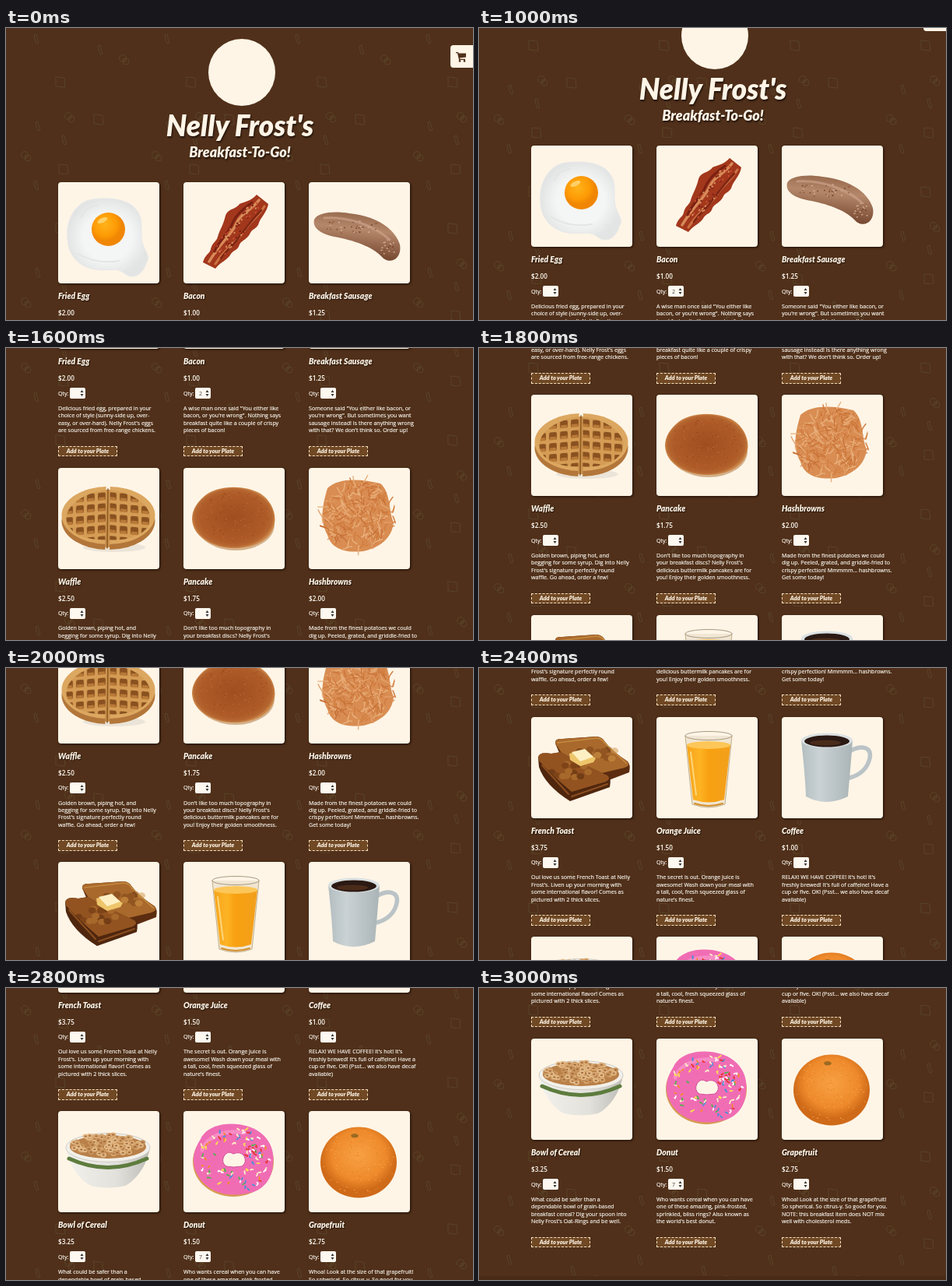
An HTML page that plays this animation: 600 by 375 pixels, repeating every 3750 ms.

```html
<!DOCTYPE html>
<html lang="en">
<head>
<meta charset="utf-8">
<title>Breakfast-To-Go!</title>
<style>
  html, body { margin: 0; width: 100%; height: 100%; overflow: hidden; background: #50301a; }
  body { position: relative; color: #fffcf5; font: 7.1px/9.4px "Open Sans", sans-serif; }
  #page { position: absolute; left: 0; top: 0; width: 600px; height: 1356px; animation: scroll 3750ms steps(21) infinite; }
  @keyframes scroll {
    0%, 23.99% { top: 0; }
    79.99%, 100% { top: -981px; }
  }
  #page > *, .item > * { position: absolute; margin: 0; white-space: pre; }
  h1, h2, h3, .add { font-family: Lato, sans-serif; font-style: italic; font-weight: 900; color: #fef5e7; }
  h1, h2 { left: 0; width: 601px; text-align: center; text-shadow: 1px 2px 2px #24130a; }
  h1 { top: 104px; font-size: 36.8px; line-height: 42px; }
  h2 { top: 148px; font-size: 18px; line-height: 22px; }
  .cart { left: 571px; top: 22px; width: 29px; height: 29px; background: #fef5e7; border-radius: 4px 0 0 4px; }
  .cart svg { position: absolute; left: 0; top: 0; }
  .item { width: 140px; height: 280px; }
  .card { left: 0; top: 0; width: 130px; height: 130px; background: #fef5e7; border-radius: 4px; box-shadow: 1px 1px 3px #1c0d05; }
  h3 { left: 0; top: 139px; font-size: 10.3px; line-height: 14px; text-shadow: 1px 1px 1px #24130a; }
  .price { left: 0; top: 162px; font-size: 8.2px; font-weight: 600; line-height: 12px; }
  .qty, .text { -webkit-text-stroke: .15px; }
  .qty { left: 0; top: 182.5px; }
  .pick { left: 15px; top: 180px; width: 20px; height: 14px; border-radius: 2px; background: #fdf8f0; color: #444; line-height: 14px; text-indent: 5px; }
  .pick svg { position: absolute; left: 13px; top: 3px; }
  .text { left: 0; top: 201.7px; }
  .add { left: 0; top: 254.5px; width: 74px; height: 11.5px; border: 1px dashed #f3dfc0; background: #704824; text-align: center; line-height: 11px; font-size: 7.4px; }
</style>
</head>
<body>
<main id="page">
  <svg width="600" height="1356">
    <defs>
      <pattern id="doodles" width="168" height="188" patternUnits="userSpaceOnUse">
        <g fill="none" stroke="#584226" stroke-width="1">
          <g id="toast"><path d="M64 65q-2-2 1-2l9 1q3 1 1 3l1 8q0 1-2 1l-9-1q-2 0-1-2z"/></g>
          <use href="#toast" x="49" y="48"/><use href="#toast" x="4" y="112"/>
          <g id="ring"><circle cx="150" cy="39" r="4.5"/><circle cx="154" cy="43" r="4"/><circle cx="152" cy="41" r="1.5"/></g>
          <use href="#ring" x="-70" y="74"/><use href="#ring" x="-126" y="124"/>
          <g id="strip"><path d="M36 9l3-1 1 5 2 6-3 1-2-5z"/></g>
          <use href="#strip" x="2" y="112"/><use href="#strip" x="82" y="14"/><use href="#strip" x="36" y="130"/>
        </g>
      </pattern>
      <pattern id="grid" width="14" height="14" patternUnits="userSpaceOnUse" patternTransform="translate(7 1)">
        <rect width="14" height="14" fill="#d59c55"/>
        <rect x="2" y="2" width="10" height="10" rx="2" fill="#8a5120"/>
        <path d="M3 8h8v4H3z" fill="#b97a38"/>
      </pattern>
      <radialGradient id="yolk" cx=".4" cy=".35"><stop stop-color="#ffb31a"/><stop offset=".7" stop-color="#fd9a05"/><stop offset="1" stop-color="#f08603"/></radialGradient>
      <radialGradient id="white"><stop offset=".6" stop-color="#f4f5f5"/><stop offset="1" stop-color="#e3e5e5"/></radialGradient>
      <linearGradient id="link" x1=".6" y1="0" x2=".4" y2="1"><stop stop-color="#94664a"/><stop offset=".35" stop-color="#b5876a"/><stop offset="1" stop-color="#6a3d26"/></linearGradient>
      <radialGradient id="cake"><stop stop-color="#a04e20"/><stop offset=".8" stop-color="#ae5b28"/><stop offset=".94" stop-color="#b66731"/><stop offset="1" stop-color="#cb8547"/></radialGradient>
      <linearGradient id="juice"><stop stop-color="#f6a41c"/><stop offset=".3" stop-color="#fdb324"/><stop offset=".5" stop-color="#f8a010"/><stop offset="1" stop-color="#f2a01c"/></linearGradient>
      <linearGradient id="mug"><stop stop-color="#b3bdc0"/><stop offset=".35" stop-color="#cad2d4"/><stop offset="1" stop-color="#aab4b7"/></linearGradient>
      <linearGradient id="bowl"><stop stop-color="#f2f1ec"/><stop offset=".6" stop-color="#e2e1dc"/><stop offset="1" stop-color="#bdbcb7"/></linearGradient>
      <radialGradient id="citrus" cx=".5" cy=".4"><stop stop-color="#f8a143"/><stop offset=".7" stop-color="#ee8a2b"/><stop offset="1" stop-color="#cf6a18"/></radialGradient>
      <clipPath id="left"><path d="M0 0H62L60 130H0z"/></clipPath>
      <clipPath id="right"><path d="M67 0H130V130H66z"/></clipPath>
    </defs>
    <rect width="600" height="1356" fill="url(#doodles)"/>
    <rect y="1351" width="600" height="5" fill="#482a17"/>
    <circle cx="303" cy="57" r="43" fill="#fef5e7"/>
  </svg>
  <h1>Nelly Frost's</h1>
  <h2>Breakfast-To-Go!</h2>
  <div class="cart">
    <svg width="29" height="29" fill="#4f2f1b">
      <path d="M7 9h3l.6 1.6H20v5l-8 1 .3 1.2H19V19h-8L9 10.3H7z"/>
      <circle cx="12" cy="20.4" r="1.3"/><circle cx="18" cy="20.4" r="1.3"/>
    </svg>
  </div>
</main>
<script>
  let seed = 7;
  const rnd = (a = 1, b = 0) => (seed = seed * 16807 % 2147483647, b + (a - b) * seed / 2147483647);
  const any = list => list[Math.floor(rnd(list.length))];
  const many = (n, draw) => Array.from({ length: n }, draw).join('');
  const path = (d, fill, more = '') => `<path d="${d}" fill="${fill}" ${more}/>`;
  const line = (d, color, w, more = '') => path(d, 'none', `stroke="${color}" stroke-width="${w}" stroke-linecap="round" ${more}`);
  const oval = (x, y, rx, ry, fill, more = '') => `<ellipse cx="${x}" cy="${y}" rx="${rx}" ry="${ry}" fill="${fill}" ${more}/>`;
  const group = (more, parts) => `<g ${more}>${parts}</g>`;

  // A random point inside an ellipse, kept outside an inner share of it.
  const spot = (x, y, rx, ry, inner = 0) => {
    const a = rnd(2 * Math.PI), r = Math.sqrt(rnd(1, inner * inner));
    return [x + rx * r * Math.cos(a), y + ry * r * Math.sin(a)];
  };
  const dots = (n, area, colors, size) => many(n, () => {
    const [x, y] = spot(...area);
    return oval(x, y, size, size * .8, any(colors));
  });
  const dashes = (n, area, colors, len, w) => many(n, () => {
    const [x, y] = spot(...area), a = rnd(2 * Math.PI), l = rnd(len, len / 2);
    return line(`M${x} ${y}q${rnd(3, -3)} ${rnd(3, -3)} ${l * Math.cos(a)} ${l * Math.sin(a)}`, any(colors), w);
  });

  const waffleHalf = (side, skew) => group(`clip-path="url(#${side})"`,
    oval(64.5, 68, 60, 37, '#b3763a') + oval(64.5, 61, 60, 37, '#dca760') +
    group(`transform="translate(64 60) skewY(${skew}) translate(-64 -60)"`, oval(64.5, 60, 54, 32, 'url(#grid)')));

  const art = {
    egg: () =>
      path('M45 22C65 19 91 22 100 35C111 48 105 62 108 78C112 90 119 95 113 104C108 121 95 125 85 117C75 108 62 115 48 112C30 110 12 96 12 71C10 45 25 24 45 22Z', 'url(#white)', 'stroke="#e6e7e7"') +
      line('M26 92Q50 106 78 101M96 102q6 6 10 0M30 45Q34 32 50 30', '#e3e5e5', 2) +
      oval(64.5, 60.5, 21.5, 21.5, 'url(#yolk)') + oval(57, 49, 7, 3, '#ffcf66', 'transform="rotate(-25 57 49)"'),
    bacon: () =>
      path('M94 16L109 28C108 37 99 46 97 52C95 60 88 60 86 65C82 74 75 74 72 80C70 88 64 87 61 92C56 101 49 101 41 111L25 103C28 92 34 92 35 86C37 77 43 76 44 70C47 60 51 56 54 43C58 33 66 36 72 28C78 25 86 25 94 16Z', '#a2371c') +
      line('M97 23C86 38 75 38 68 53C62 68 48 76 33 102', '#d88a58', 3.5) +
      line('M104 31C95 46 84 52 77 64C68 78 54 84 41 105', '#cb7242', 3) +
      line('M88 26C72 38 66 44 61 57C55 68 45 77 40 89', '#7a2012', 3) +
      line('M100 36C88 48 80 59 71 71C64 82 55 87 48 98', '#802614', 2.5) +
      group('transform="rotate(-53 67 63)"', dots(55, [67, 63, 47, 10], ['#c9502e', '#7a2114', '#d98f5c'], 1.3)),
    sausage: () =>
      path('M7 48C12 38 34 37 52 40C84 43 110 58 117 80C120 96 108 106 96 98C84 84 62 76 38 71C18 68 4 60 7 48Z', 'url(#link)') +
      line('M20 46C48 44 82 54 104 74', '#d0a890', 3, 'opacity=".6"') +
      dots(34, [56, 57, 38, 9], ['#7c4a31', '#d4b09a', '#8d5d42'], 1.1) + dots(18, [102, 84, 10, 10], ['#70412c', '#d0a68c'], 1.1),
    waffle: () =>
      oval(72, 102, 40, 6, '#ebe4d8') + path('M60 28h8v74h-8z', '#c9924c') +
      waffleHalf('left', -5) + waffleHalf('right', 5) + line('M64 27L63 103', '#8d5722', 1.5),
    pancake: () =>
      oval(67, 73, 50, 33, '#d3b08a') +
      path('M26 37C42 22 78 21 99 33C113 42 121 60 116 75C110 96 85 104 61 103C34 101 12 87 11 66C11 54 17 45 26 37Z', 'url(#cake)') +
      dots(150, [64, 63, 46, 35], ['#96471b', '#bb6b38', '#a85425'], .8),
    hash: () =>
      path('M24 26C38 12 68 14 92 20C106 32 102 55 109 70C107 90 92 102 70 107C44 110 28 102 24 86C14 68 17 50 24 26Z', '#d98d52') +
      dashes(270, [63, 62, 45, 44], ['#e3a06a', '#d07c3e', '#e9b07c', '#d98b50', '#c87238'], 13, 1.4),
    toast: () =>
      path('M31 34Q30 27 40 28L84 25Q92 26 95 32Q104 44 124 57Q128 61 126 71L84 87L50 78Z', '#5c2c10') +
      path('M31 34Q30 27 40 28L84 25Q92 26 95 32Q104 44 124 57Q128 62 120 65L82 74L50 62Z', '#a9692c') +
      group('opacity=".5"', dots(16, [82, 48, 28, 12], ['#5f2e0f', '#cf9546', '#7a4217'], 5)) +
      line('M34 33L84 27Q92 28 95 34L122 59', '#c48a40', 1.5) +
      path('M9 52Q10 44 26 47L38 45Q60 58 100 76Q103 79 101 90L50 108Q18 88 10 64Z', '#4f260e') +
      path('M9 52Q10 44 26 47L38 45Q60 58 98 75Q103 79 96 83L52 96Q26 74 10 56Z', '#935320') +
      group('opacity=".5"', dots(16, [50, 70, 24, 13], ['#54290d', '#bb7d36', '#6b3712'], 5)) +
      line('M52 102L98 86M14 62L48 99', '#8b4e1f', 2) +
      path('M49 47L67 42L83 53L80 58L63 63L50 55Z', '#eec56a') + path('M52 45L69 41L80 51L63 57Z', '#fff0c4'),
    glass: () =>
      path('M37 24L46 112Q67 120 88 112L97 24Z', '#f0e6d3') +
      path('M39 36L47 106Q67 113 87 106L95 36Z', 'url(#juice)') + oval(67, 36, 28, 5, '#fcc758') +
      line('M37 24L46 112Q67 120 88 112L97 24', '#c2ad88', 1) + oval(67, 24, 30, 5.5, 'none', 'stroke="#a89a82"') +
      line('M44 45L51 100', '#ffd67a', 2) + line('M49 111Q67 117 85 111', '#d28f2c', 2),
    mug: () =>
      line('M89 43C102 36 116 38 113 53C110 66 102 74 87 78', '#bac3c6', 5.5) +
      path('M25 30C28 58 30 78 31 102Q57 116 85 102C87 78 89 58 91 30Z', 'url(#mug)') +
      oval(58, 30, 33, 9.5, '#dbe1e2') + oval(58, 31, 29, 7.5, '#2b1913') + oval(56, 33, 20, 3.5, '#4a2b1a'),
    cereal: () =>
      path('M10 47C14 72 30 90 42 96Q64 101 86 96C98 90 114 72 118 47Z', 'url(#bowl)') +
      line('M14 61Q64 84 114 61', '#5d7c3e', 5) +
      oval(64, 47, 54, 18.5, '#f2f0ea', 'stroke="#cfcdc6"') + oval(64, 46, 49, 15, '#b98049') +
      many(110, () => {
        const [x, y] = spot(64, 43, 46, 14);
        return oval(x, y, 2.7, 2, '#a0683a', `stroke="${any(['#d9a871', '#c8935c', '#e2b985'])}" stroke-width="2"`);
      }),
    donut: () =>
      oval(64, 65, 52, 45, '#d79a52') +
      path('M22 36C30 18 58 12 84 20C108 28 118 48 115 68C114 90 100 104 80 106C50 112 26 100 16 78C10 64 13 50 22 36Z', '#f06db4') +
      line('M24 50C32 30 56 24 78 28', '#f99bce', 5, 'opacity=".7"') +
      dashes(95, [64, 62, 46, 41, .4], ['#fff', '#ffe14d', '#4b8fd6', '#e5352f', '#fff2c9', '#f58a2a', '#52b04d'], 4, 1.7) +
      path('M52 58Q57 50 64 55Q73 51 78 58Q82 66 75 71Q64 73 55 71Q48 66 52 58Z', '#fef5e7', 'stroke="#d24f98"'),
    fruit: () =>
      oval(64, 66, 49, 45.5, 'url(#citrus)') + dots(170, [64, 66, 46, 42], ['#f6a957', '#e27f26'], .7) +
      path('M54 31q5-4 10 0q-1 4-5 3q-4 1-5-3z', '#9b6a22')
  };

  const items = [
    ['Fried Egg', '2.00', '', 'egg', "Delicious fried egg, prepared in your\nchoice of style (sunny-side up, over-\neasy, or over-hard). Nelly Frost's eggs\nare sourced from free-range chickens."],
    ['Bacon', '1.00', 2, 'bacon', 'A wise man once said "You either like\nbacon, or you\'re wrong". Nothing says\nbreakfast quite like a couple of crispy\npieces of bacon!'],
    ['Breakfast Sausage', '1.25', '', 'sausage', 'Someone said "You either like bacon, or\nyou\'re wrong". But sometimes you want\nsausage instead! Is there anything wrong\nwith that? We don\'t think so. Order up!'],
    ['Waffle', '2.50', '', 'waffle', "Golden brown, piping hot, and\nbegging for some syrup. Dig into Nelly\nFrost's signature perfectly round\nwaffle. Go ahead, order a few!"],
    ['Pancake', '1.75', '', 'pancake', "Don't like too much topography in\nyour breakfast discs? Nelly Frost's\ndelicious buttermilk pancakes are for\nyou! Enjoy their golden smoothness."],
    ['Hashbrowns', '2.00', '', 'hash', 'Made from the finest potatoes we could\ndig up. Peeled, grated, and griddle-fried to\ncrispy perfection! Mmmmm... hashbrowns.\nGet some today!'],
    ['French Toast', '3.75', '', 'toast', "Oui love us some French Toast at Nelly\nFrost's. Liven up your morning with\nsome international flavor! Comes as\npictured with 2 thick slices."],
    ['Orange Juice', '1.50', '', 'glass', "The secret is out. Orange Juice is\nawesome! Wash down your meal with\na tall, cool, fresh squeezed glass of\nnature's finest."],
    ['Coffee', '1.00', '', 'mug', "RELAX! WE HAVE COFFEE! It's hot! It's\nfreshly brewed! It's full of caffeine! Have a\ncup or five. OK! (Psst... we also have decaf\navailable)"],
    ['Bowl of Cereal', '3.25', '', 'cereal', "What could be safer than a\ndependable bowl of grain-based\nbreakfast cereal? Dig your spoon into\nNelly Frost's Oat-Rings and be well."],
    ['Donut', '1.50', 7, 'donut', "Who wants cereal when you can have\none of these amazing, pink-frosted,\nsprinkled, bliss rings? Also known as\nthe world's best donut."],
    ['Grapefruit', '2.75', '', 'fruit', 'Whoa! Look at the size of that grapefruit!\nSo spherical. So citrus-y. So good for you.\nNOTE: this breakfast item does NOT mix\nwell with cholesterol meds.']
  ];

  const arrows = '<svg width="5" height="8" fill="#333"><path d="M.5 3L2.5 0l2 3zM.5 5h4l-2 3z"/></svg>';
  const html = items.map(([name, price, count, pic, text], i) => `
    <section class="item" style="left:${67 + i % 3 * 161}px;top:${198 + Math.floor(i / 3) * 282.67}px">
      <svg class="card" viewBox="0 0 130 130">${art[pic]()}</svg>
      <h3>${name}</h3>
      <div class="price">$${price}</div>
      <div class="qty">Qty:</div>
      <div class="pick">${count}${arrows}</div>
      <p class="text">${text}</p>
      <div class="add">Add to your Plate</div>
    </section>`).join('');
  document.getElementById('page').insertAdjacentHTML('beforeend', html);
</script>
</body>
</html>
```
